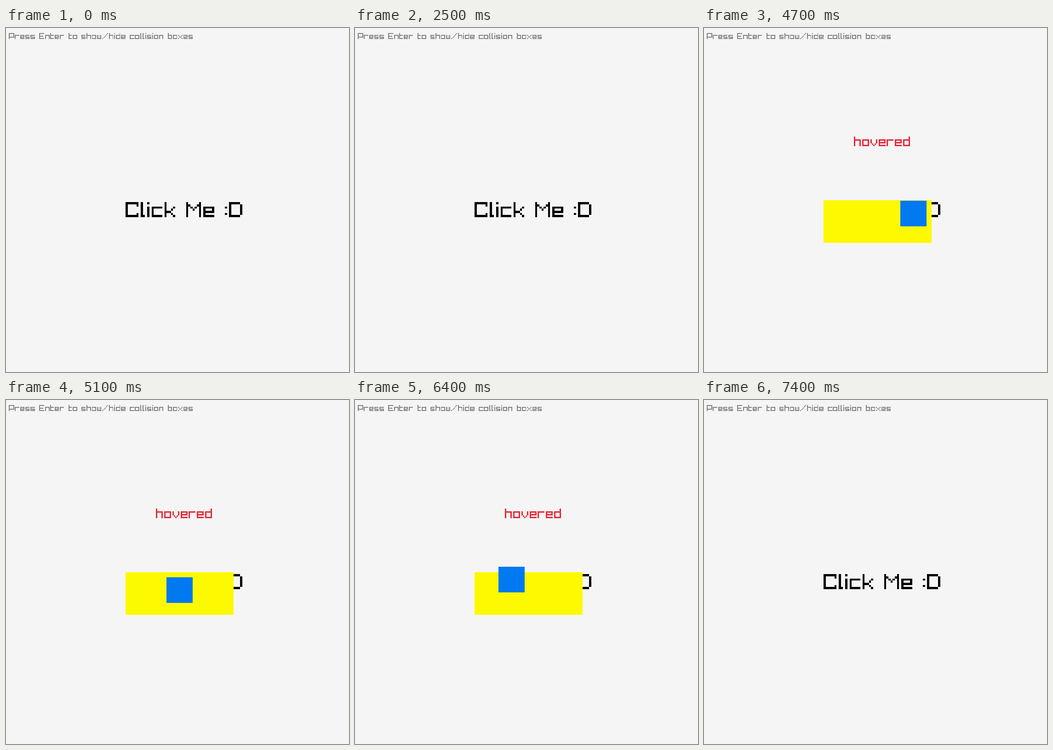
Recreate the animation shown at these times as an HTML page. Size 746 by 751 pixels, loop 8400 ms.

```html
<!DOCTYPE html>
<html lang="en">
<head>
<meta charset="utf-8">
<title>Button collision demo</title>
<style>
  html, body { margin: 0; width: 100%; height: 100%; overflow: hidden; background: #f5f5f5; }
  svg { display: block; width: 746px; height: 751px; shape-rendering: crispEdges; }
  path { fill: none; stroke-width: 1; stroke-linecap: square; stroke-linejoin: miter; }
</style>
</head>
<body>
<svg id="stage" viewBox="0 0 746 751"></svg>
<script>
const LOOP = 8400, STEP = 100, ZOOM = 0.9387;
const NS = 'http://www.w3.org/2000/svg';
const stage = document.getElementById('stage');

// Glyphs: width in cells, then strokes through cell centres.
const GLYPHS = {
  ' ': [3, ''],
  '/': [7, 'M6 0h0M5 1h0M4 2h0M3 3h0M2 4h0M1 5h0M0 6h0'],
  ':': [1, 'M0 2h0M0 5h0'],
  C: [6, 'M5 1V0H0V6H5V5'],
  D: [6, 'M4 0H0V6H4M5 1V5'],
  E: [6, 'M5 0H0V6H5M0 3H4'],
  M: [7, 'M0 0V6M6 0V6M1 1h0M2 2h0M3 3h0M4 2h0M5 1h0'],
  P: [6, 'M0 6V0H5V4H0'],
  b: [5, 'M0 0V6H4V2H0'],
  c: [5, 'M4 2H0V6H4'],
  d: [5, 'M4 0V6H0V2H4'],
  e: [5, 'M4 6H0V2H4V4H0'],
  h: [5, 'M0 0V6M0 2H4V6'],
  i: [1, 'M0 0h0M0 2V6'],
  k: [5, 'M0 0V6M1 4H2M3 3h0M4 2h0M3 5h0M4 6h0'],
  l: [2, 'M0 0V6H1'],
  n: [5, 'M0 6V2H4V6'],
  o: [5, 'M0 2H4V6H0Z'],
  p: [5, 'M0 8V2H4V6H0'],
  r: [5, 'M0 6V2H4'],
  s: [5, 'M4 2H0V4H4V6H0'],
  t: [4, 'M0 0V6H3M0 2H3'],
  v: [5, 'M0 2V4M4 2V4M1 5h0M3 5h0M2 6h0'],
  w: [5, 'M0 2V6H4V2M2 2V6'],
  x: [5, 'M0 2h0M1 3h0M2 4h0M3 5h0M4 6h0M4 2h0M3 3h0M1 5h0M0 6h0']
};

function add(parent, name, attrs) {
  const node = document.createElementNS(NS, name);
  for (const key in attrs) node.setAttribute(key, attrs[key]);
  parent.appendChild(node);
  return node;
}

function label(text, x, y, size, color) {
  const unit = size / 10 * ZOOM;
  const gap = Math.floor(size / 10) * ZOOM / unit;
  const group = add(stage, 'g', {
    role: 'img', 'aria-label': text, stroke: color,
    transform: `translate(${x} ${y}) scale(${unit})`
  });
  let pen = 0;
  for (const ch of text) {
    const [width, d] = GLYPHS[ch];
    if (d) add(group, 'path', { d, transform: `translate(${pen + 0.5} 0.5)` });
    pen += width + gap;
  }
  return group;
}

label('Press Enter to show/hide collision boxes', 6.3, 11.2, 20, '#828282');
label('Click Me :D', 260.2, 380.2, 50, '#000');
const states = {
  hovered: label('hovered', 326, 237.3, 32, '#e62937'),
  pressed: label('pressed', 326, 237.3, 32, '#e62937')
};
const zone = { x: 260, y: 376, width: 235, height: 93 };
const button = add(stage, 'rect', { ...zone, fill: '#fdf900' });
const cursor = add(stage, 'rect', { width: 57, height: 56, fill: '#0079f1' });

// State changes while the boxes are hidden: time, state.
const changes = [
  [0, ''], [900, 'hovered'], [1100, ''], [1200, 'hovered'], [1400, ''],
  [1700, 'hovered'], [2200, 'pressed'], [2500, ''], [3000, 'hovered'],
  [3200, 'pressed'], [3500, ''], [7200, 'hovered'], [7400, '']
];

// Cursor path: time, x, y.
const route = [
  [4300, 351, 204], [4400, 430, 115], [4600, 474, 330], [4800, 380, 423],
  [4900, 240, 360], [5100, 349, 387], [5300, 399, 360], [5600, 284, 393],
  [5900, 294, 371], [6200, 362, 332], [6500, 287, 380], [6800, 350, 407],
  [7000, 300, 370], [7100, 254, 347]
];
const SHOW = 4300, HIDE = 7200;

function place(t) {
  const i = Math.max(1, route.findIndex(point => point[0] >= t));
  const [t0, x0, y0] = route[i - 1], [t1, x1, y1] = route[i];
  const f = (t - t0) / (t1 - t0);
  return [Math.round(x0 + (x1 - x0) * f), Math.round(y0 + (y1 - y0) * f)];
}

function touches(x, y) {
  return x < zone.x + zone.width && x + 57 > zone.x &&
         y < zone.y + zone.height && y + 56 > zone.y;
}

function show(node, on) {
  node.setAttribute('visibility', on ? 'visible' : 'hidden');
}

function draw(time) {
  const t = Math.floor(time % LOOP / STEP) * STEP;
  const boxes = t >= SHOW && t < HIDE;
  let state = changes.filter(change => change[0] <= t).pop()[1];
  if (boxes) {
    const [x, y] = place(t);
    cursor.setAttribute('x', x);
    cursor.setAttribute('y', y);
    state = !touches(x, y) ? '' : t >= 5300 && t < 5600 ? 'pressed' : 'hovered';
  }
  show(button, boxes);
  show(cursor, boxes);
  for (const name in states) show(states[name], name === state);
}

const start = performance.now();
function tick() {
  draw(performance.now() - start);
  requestAnimationFrame(tick);
}
tick();
</script>
</body>
</html>
```
